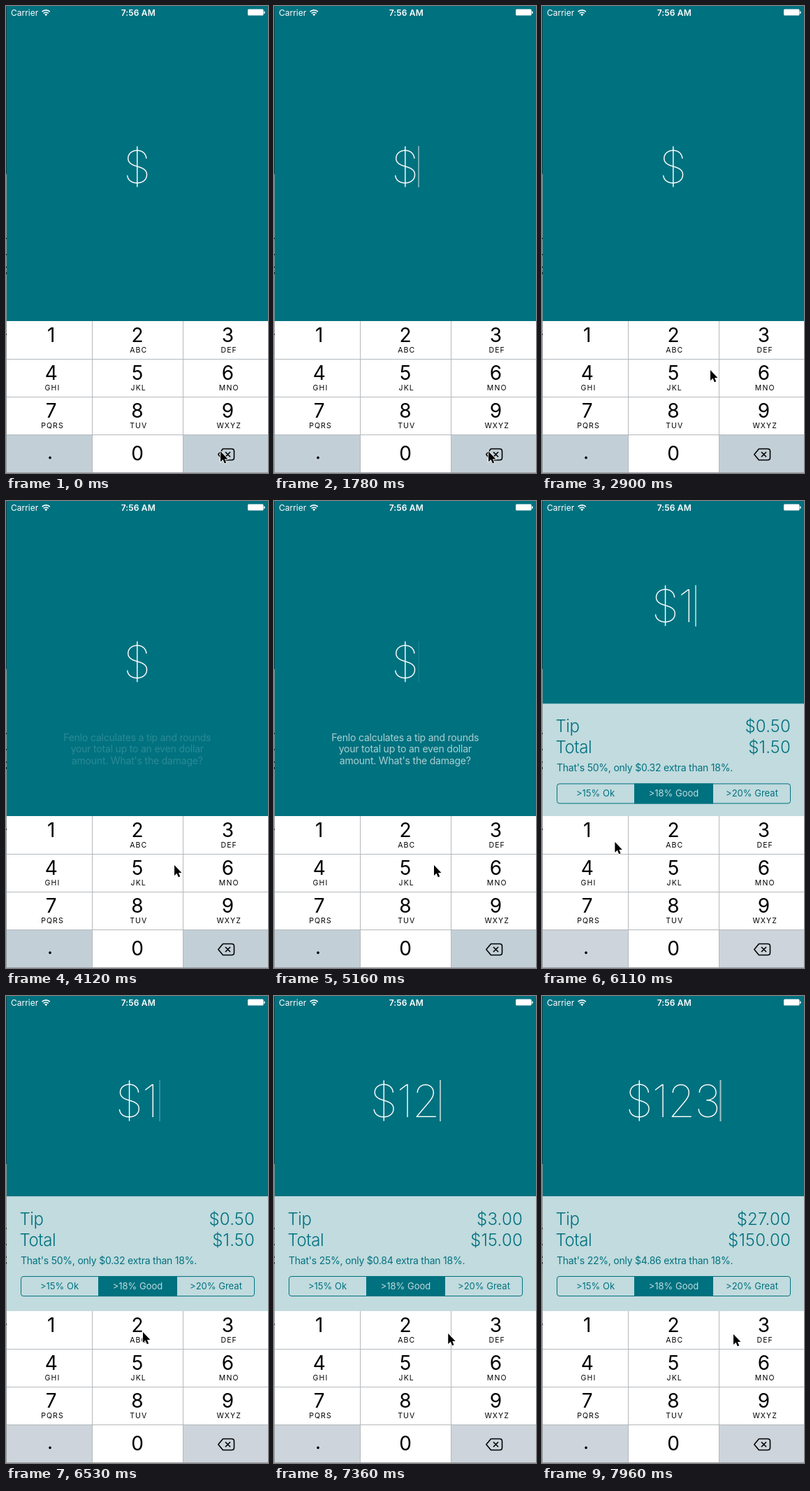
Animation, 375 px wide and 667 px high, one loop 7.99 s. Source, as an HTML page:

```html
<!DOCTYPE html>
<html lang="en">
<head>
<meta charset="utf-8">
<title>Tip calculator</title>
<style>
  html, body { margin: 0; width: 100%; height: 100%; overflow: hidden; background: #00717f; }
  svg { display: block; font-family: Inter, Roboto, sans-serif; }
  .mid { text-anchor: middle; }
  .end { text-anchor: end; }
  .status { fill: #fff; font-size: 12px; }
  .clock { font-weight: 600; letter-spacing: .15px; }
  .amount { fill: #fff; font-size: 64px; font-weight: 100; letter-spacing: -1.2px; }
  .hint { fill: #a9d0d3; font-size: 14px; letter-spacing: -.2px; }
  .panel { fill: #00717f; }
  .big { font-size: 24px; font-weight: 300; letter-spacing: .2px; }
  .label { letter-spacing: -.4px; }
  .note { font-size: 14px; letter-spacing: -.23px; }
  .choice { font-size: 13px; }
  .digit { font-size: 28px; }
  .letters { font-size: 10.5px; letter-spacing: 1.1px; }
</style>
</head>
<body>
<svg width="375" height="667" viewBox="0 0 375 667">
  <rect width="375" height="667" fill="#00717f"/>

  <g class="status">
    <text x="7" y="13.5">Carrier</text>
    <text x="189.3" y="13.5" class="clock mid">7:56 AM</text>
    <path d="M51.6 8.2a8 8 0 0 1 11.2 0M53.7 10.5a5 5 0 0 1 7 0" fill="none" stroke="#fff" stroke-width="1.7"/>
    <path d="M57.2 14.2l-2-2.2a3 3 0 0 1 4 0z"/>
    <rect x="346" y="4.5" width="22.5" height="9" rx="1.5"/>
    <rect x="369" y="7.5" width="1.5" height="3.5" rx=".7"/>
  </g>

  <g id="hint" class="hint mid">
    <text x="187.8" y="342.5">Fenlo calculates a tip and rounds</text>
    <text x="187.8" y="359.3">your total up to an even dollar</text>
    <text x="187.8" y="376">amount. What's the damage?</text>
  </g>

  <g id="amountRow">
    <text id="amount" class="amount mid" x="187" y="252.7"></text>
    <rect id="caret" y="200" width="2" height="59" fill="#9dc6ca"/>
  </g>

  <g id="panel" class="panel">
    <rect y="286" width="375" height="190" fill="#c1dbde"/>
    <text class="big label" x="19.5" y="327">Tip</text>
    <text class="big label" x="19.5" y="357">Total</text>
    <text id="tip" class="big end" x="356" y="327"></text>
    <text id="total" class="big end" x="356" y="357"></text>
    <text id="note" class="note" x="21" y="383"></text>
    <rect x="21.5" y="400.5" width="334" height="28" rx="3.5" fill="none" stroke="#00717f"/>
    <rect x="132" y="400" width="113" height="29"/>
    <g class="choice mid">
      <text x="76.5" y="419">&gt;15% Ok</text>
      <text x="188.5" y="419" fill="#c1dbde">&gt;18% Good</text>
      <text x="300.5" y="419">&gt;20% Great</text>
    </g>
  </g>

  <g id="keyboard"></g>
  <path id="mouse" d="M0 0V15L3.5 11.8 5.8 17.3 8.2 16.3 6 11H10.4Z"
    stroke="#fff" stroke-width="1.6" paint-order="stroke"/>

  <g id="edge">
    <rect width="1" height="240" fill="#16434c"/>
    <rect y="240" width="1" height="427" fill="#8f9496"/>
    <path d="M0 331h1v2H0zM0 354h1v2H0zM0 372h1v2H0zM0 380h1v3H0zM0 468h1v2H0z" fill="#222"/>
    <rect y="666" width="375" height="1" fill="#9a9da0"/>
  </g>
</svg>

<script>
const LOOP = 7990;
const el = id => document.getElementById(id);
const clamp = v => Math.min(1, Math.max(0, v));
const ease = p => p * p * (3 - 2 * p);
const mix = (a, b, p) => a + (b - a) * p;

// Keyboard
const columns = [[1, 122, 64.8], [124, 129, 188], [254, 121, 317.5]];
const captions = ['', 'ABC', 'DEF', 'GHI', 'JKL', 'MNO', 'PQRS', 'TUV', 'WXYZ'];
const labels = [1, 2, 3, 4, 5, 6, 7, 8, 9, '.', 0, ''];

el('keyboard').innerHTML = '<rect y="450" width="375" height="217" fill="#b4b8bb"/>' +
  labels.map((label, i) => {
    const [x, width, center] = columns[i % 3];
    const row = Math.floor(i / 3), top = 450 + 54 * row + (row ? 1 : 0);
    const baseline = row < 3 ? 480 + 54 * row : label === 0 ? 649 : 647;
    return `<rect id="key${i}" x="${x}" y="${top}" width="${width}" height="${row ? 53 : 54}" fill="#fff"/>
      <text class="digit mid" x="${label === '.' ? 63 : center}" y="${baseline}">${label}</text>
      <text class="letters mid" x="${center + 1.7}" y="${baseline + 15}">${captions[i] || ''}</text>`;
  }).join('') +
  `<path d="M310.5 632.5H323q3.5 0 3.5 3.5v9q0 3.5-3.5 3.5H310.5L303.8 640.5zM314 637l7 7m0-7l-7 7"
    fill="none" stroke="#000" stroke-width="1.6" stroke-linejoin="round"/>`;

// Entered amounts: time, amount, caret x, tip, total, percent, extra
const entries = [
  [0, '$', 206, '', '', '', ''],
  [5870, '$1', 219, '$0.50', '$1.50', 50, '0.32'],
  [6960, '$12', 237, '$3.00', '$15.00', 25, '0.84'],
  [7780, '$123', 254.5, '$27.00', '$150.00', 22, '4.86']
];
const presses = [[0, 5800, 6020], [1, 6910, 7120], [2, 7720, 7955]];
const caretFades = [[-200, 0], [220, 1], [770, 0], [1220, 1], [1740, 0], [2210, 1], [2720, 0],
  [3140, 1], [3710, 0], [4150, 1], [4700, 0], [5145, 1], [6440, 0], [6880, 1], [7470, 0], [7700, 1]];
const mousePath = [[0, 307, 636], [1850, 307, 636], [2310, 241, 520], [5159, 241, 520],
  [5160, 229, 520], [5640, 103, 487], [6080, 103, 487], [6510, 196, 480],
  [7130, 196, 480], [7500, 274, 483], [LOOP, 274, 483]];

const latest = (list, t) => list.filter(item => item[0] <= t).pop();

function spring(ms) {
  if (ms <= 0) return 0;
  const damping = .76, x = ms * .016, r = Math.sqrt(1 - damping * damping);
  return 1 - Math.exp(-damping * x) * (Math.cos(r * x) + damping / r * Math.sin(r * x));
}

function mouseAt(t) {
  const i = mousePath.findIndex(point => point[0] > t);
  const [t0, x0, y0] = mousePath[i - 1], [t1, x1, y1] = mousePath[i];
  const p = ease((t - t0) / (t1 - t0));
  return [mix(x0, x1, p), mix(y0, y1, p)];
}

const move = (id, x, y) => el(id).setAttribute('transform', `translate(${x} ${y})`);

function draw(t) {
  const [, amount, caretX, tip, total, percent, extra] = latest(entries, t);
  el('amount').textContent = amount;
  el('tip').textContent = tip;
  el('total').textContent = total;
  el('note').textContent = `That's ${percent}%, only $${extra} extra than 18%.`;

  const [fadeStart, visible] = latest(caretFades, t);
  const fade = clamp((t - fadeStart) / 140);
  el('caret').setAttribute('x', caretX);
  el('caret').setAttribute('opacity', visible ? fade : 1 - fade);

  el('hint').setAttribute('opacity', t < 5870 ? clamp((t - 4070) / 200) : 0);
  move('amountRow', 0, -80 * spring(t - 5880));
  move('panel', 0, 164 * (1 - spring(t - 5895)));
  move('mouse', ...mouseAt(t));

  for (const [key, down, up] of presses)
    el('key' + key).setAttribute('fill', t >= down && t < up ? '#ced4da' : '#fff');
  const p = clamp((t - 5840) / 90);
  const shade = `rgb(${mix(194, 205, p)},${mix(207, 212, p)},${mix(215, 219, p)})`;
  el('key9').setAttribute('fill', shade);
  el('key11').setAttribute('fill', shade);
}

const start = performance.now();
function tick() {
  draw((performance.now() - start) % LOOP);
  requestAnimationFrame(tick);
}
tick();
</script>
</body>
</html>
```
